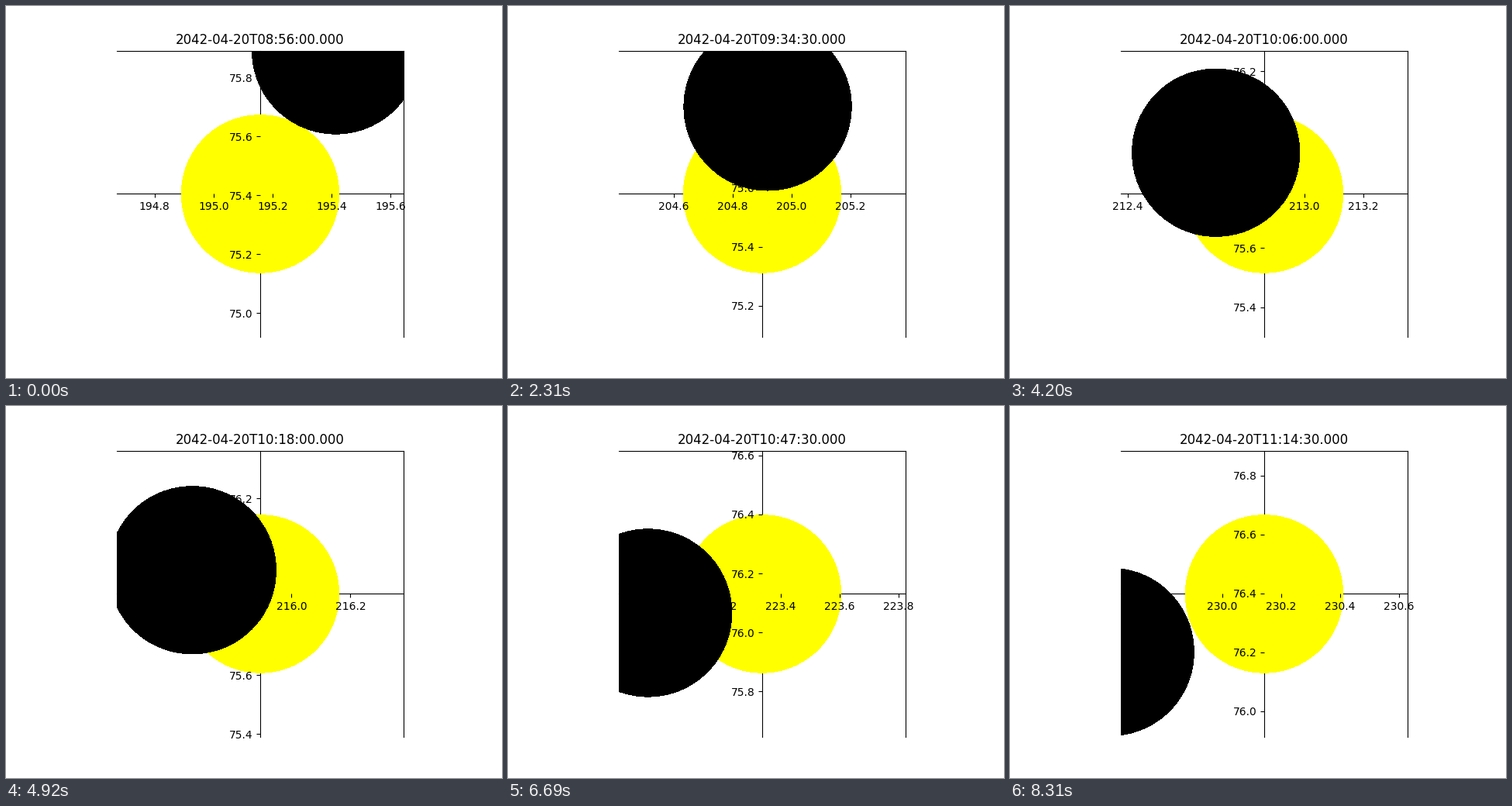
Recreate the animation shown at these times as a matplotlib script. Size 640 by 480 pixels, loop 8.34 s.

```python
import matplotlib.pyplot as plt
import numpy as np
from matplotlib.animation import FuncAnimation
from matplotlib.patches import Circle
from matplotlib.ticker import FormatStrFormatter, MultipleLocator

FRAMES, INTERVAL = 278, 30
STEP = 30                        # seconds of sky time per frame
START = 8 * 3600 + 56 * 60
LATITUDE = np.radians(86.81)
HALF = 0.4857                    # half width of the view in degrees

plt.rcParams["text.kerning_factor"] = 6


def sun_position(t):
    """Azimuth and zenith angle in degrees, t minutes after the start."""
    hour = np.radians(14.966 + 0.25005 * t)
    dec = np.radians(11.5148 + 0.00022 * t)
    sin_lat, cos_lat = np.sin(LATITUDE), np.cos(LATITUDE)
    east = np.sin(hour) * np.cos(dec)
    south = np.cos(hour) * np.cos(dec) * sin_lat - np.sin(dec) * cos_lat
    up = sin_lat * np.sin(dec) + cos_lat * np.cos(dec) * np.cos(hour)
    return 180 + np.degrees(np.arctan2(east, south)), np.degrees(np.arccos(up))


def moon_offset(t):
    """Moon relative to the sun: a nearly straight, slowing drift."""
    return (0.2562 - 0.006386 * t + 5.52e-6 * t**2,
            0.4873 - 0.004993 * t + 3.9e-7 * t**2)


def timestamp(seconds):
    minutes, sec = divmod(seconds, 60)
    hour, minute = divmod(minutes, 60)
    return f"2042-04-20T{hour:02d}:{minute:02d}:{sec:02d}.000"


def disc(radius, color, zorder):
    return ax.add_patch(Circle((0, 0), radius, color=color, zorder=zorder,
                               antialiased=False))


fig, ax = plt.subplots(figsize=(6.4, 4.8), dpi=100)
ax.set_aspect("equal")
for side in ("left", "bottom"):
    ax.spines[side].set_position("center")
for spine in ax.spines.values():
    spine.set_zorder(0.5)
for axis in (ax.xaxis, ax.yaxis):
    axis.set_major_locator(MultipleLocator(0.2))
    axis.set_major_formatter(FormatStrFormatter("%.1f"))
    axis.set_zorder(1.5)

sun = disc(0.2655, "yellow", 1)
moon = disc(0.2823, "black", 2)
title = ax.set_title("")


def update(i):
    t = i * STEP / 60
    x, y = sun_position(t)
    dx, dy = moon_offset(t)
    sun.center = x, y
    moon.center = x + dx, y + dy
    ax.set_xlim(x - HALF, x + HALF)
    ax.set_ylim(y - HALF, y + HALF)
    title.set_text(timestamp(START + i * STEP))
    return sun, moon, title


anim = FuncAnimation(fig, update, frames=FRAMES, interval=INTERVAL,
                     repeat=True, repeat_delay=0, blit=False)
plt.show()
```
